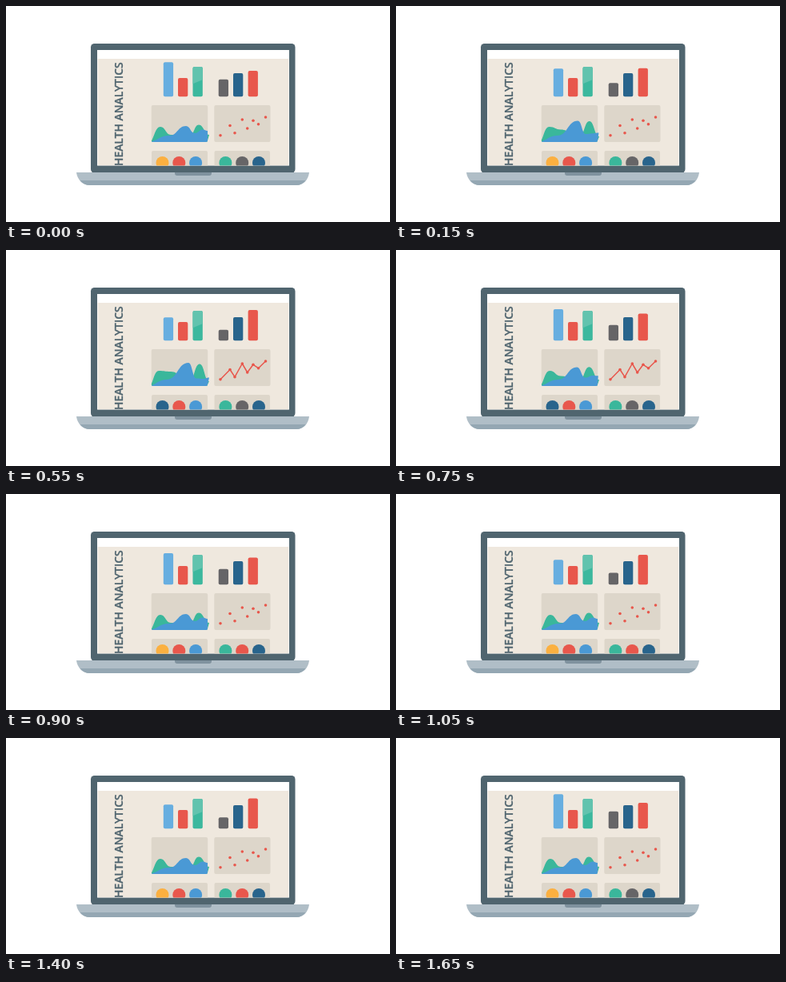
Animation of 480 by 270 pixels, one loop 1700 ms. Source, as an HTML page:

```html
<!DOCTYPE html>
<html lang="en">
<head>
<meta charset="utf-8">
<title>Health analytics</title>
<style>
  html, body { margin: 0; width: 100%; height: 100%; overflow: hidden; background: #fff; }
  svg { display: block; width: 480px; height: 270px; }
  text { font: 600 13.9px "Open Sans", sans-serif; fill: #50656f; stroke: #50656f; stroke-width: .3px; }
</style>
</head>
<body>
<svg viewBox="0 0 480 270">
  <defs>
    <clipPath id="screen"><rect x="114" y="55" width="240" height="144.600"/></clipPath>
    <clipPath id="tealBar"><rect x="233.500" y="76" width="12.300" height="37.300" rx="2"/></clipPath>
    <clipPath id="chart"><rect x="181.700" y="124" width="76" height="46" rx="2"/></clipPath>
  </defs>

  <rect x="106" y="47" width="255.500" height="161.500" rx="4.500" fill="#50656f"/>
  <path d="M88 208H379C378 217 372 224 363 224H105C96 224 89 217 88 208Z" fill="#b0bec7"/>
  <path d="M92.500 218H374.500C371.500 222 367.500 224 363 224H105C99.500 224 95.500 222 92.500 218Z" fill="#94a7b3"/>
  <path d="M211 208H257V209Q257 212 254 212H214Q211 212 211 209Z" fill="#7f929e"/>

  <g clip-path="url(#screen)">
    <rect x="114" y="55" width="240" height="145" fill="#fff"/>
    <rect x="114.700" y="66" width="238.700" height="133.400" fill="#efe8de"/>
    <text transform="translate(146 200) rotate(-90)">HEALTH ANALYTICS</text>
    <g id="bars"></g>
    <g clip-path="url(#tealBar)">
      <rect x="233" y="76" width="14" height="38" fill="#3cb89e"/>
      <path d="M233 76H247V91.500L233 97.500Z" fill="#62c3ae"/>
    </g>
    <g fill="#ddd6ca">
      <rect x="181.700" y="124" width="70.500" height="46" rx="2"/>
      <rect x="260.300" y="124" width="70.200" height="46" rx="2"/>
      <rect x="182" y="181" width="70" height="30" rx="2"/>
      <rect x="260.500" y="181" width="69.500" height="30" rx="2"/>
    </g>
    <g clip-path="url(#chart)">
      <path id="tealArea" fill="#3ab79b"/>
      <path id="blueArea" fill="#4a99d5"/>
    </g>
    <polyline id="trend" fill="none" stroke="#e8574c" stroke-width="1.500" stroke-linejoin="round"/>
    <g id="dots" fill="#e8574c"></g>
    <g id="circles"></g>
  </g>
</svg>

<script>
const LOOP = 1700, STEP = 50, BEAT = 825;
const RED = '#e8574c', NAVY = '#28648c', GRAY = '#666567', YELLOW = '#fbb040',
      TEAL = '#3ab79b', BLUE = '#4a99d5';
const $ = id => document.getElementById(id);
const mix = (a, b, k) => a + (b - a) * k;

function add(parent, tag, attrs) {
  const el = document.createElementNS('http://www.w3.org/2000/svg', tag);
  for (const key in attrs) el.setAttribute(key, attrs[key]);
  return $(parent).appendChild(el);
}

function addBar(x, fill, rest, peak = rest) {
  return { el: add('bars', 'rect', { x, width: 12.3, rx: 2, fill }), rest, peak };
}
const bars = [
  addBar(196.8, '#67aee0', 70.3, 87),
  addBar(215, RED, 90),
  addBar(265.7, GRAY, 91.8, 101.2),
  addBar(284, NAVY, 84),
  addBar(302.6, RED, 81, 74)
];

const points = [[268, 161.7], [280, 149.5], [286, 158.7], [295.3, 142],
                [301.7, 153], [309, 143.3], [315.5, 147.7], [324.5, 139]];
$('trend').setAttribute('points', points.join(' '));
points.forEach(([cx, cy]) => add('dots', 'circle', { cx, cy, r: 1.8 }));

const circles = [YELLOW, RED, BLUE, TEAL, GRAY, NAVY].map((fill, i) => {
  const cx = 195.5 + 20.8 * (i % 3) + 78.9 * Math.floor(i / 3);
  return add('circles', 'circle', { cx, cy: 196, r: 8, fill });
});

// crests and valleys of each wave, at rest and swollen
const teal = {
  low: [[177, 172], [193, 151], [206, 161], [229, 163], [241, 148.5], [254, 161]],
  high: [[177, 172], [191, 151], [206, 152], [229, 164], [242, 142.5], [254, 164]]
};
const blue = {
  low: [[176, 170], [204, 162], [225, 150], [236, 159], [246, 154.5], [252, 156]],
  high: [[176, 170], [201, 162], [228, 141], [238, 160.5], [246, 161], [254, 159.5]]
};

function wave({ low, high }, k) {
  const pts = low.map((p, i) => p.map((v, j) => mix(v, high[i][j], k)));
  const curves = pts.slice(1).map(([x, y], i) => {
    const [x0, y0] = pts[i], mid = (x0 + x) / 2;
    return `C${mid} ${y0} ${mid} ${y} ${x} ${y}`;
  });
  return `M${pts[0]}${curves.join('')}L252 168Q252 170 250 170H176Z`;
}

function draw(t) {
  const pulse = Math.abs(Math.sin(Math.PI * t / BEAT));
  const swing = pulse ** 1.2;
  const swell = t < BEAT ? Math.min(1, 1.35 * pulse) : 0;
  const lined = t >= 450 && t < 900;
  const flagged = t >= 900 && t < 1500;

  for (const { el, rest, peak } of bars) {
    const y = mix(rest, peak, swing);
    el.setAttribute('y', y);
    el.setAttribute('height', 113.3 - y);
  }
  $('tealArea').setAttribute('d', wave(teal, swell));
  $('blueArea').setAttribute('d', wave(blue, swell));
  $('trend').setAttribute('visibility', lined ? 'visible' : 'hidden');
  circles[0].setAttribute('fill', lined ? NAVY : YELLOW);
  circles[4].setAttribute('fill', flagged ? RED : GRAY);
}

const start = performance.now();
function tick() {
  const t = (performance.now() - start) % LOOP;
  draw(Math.floor(t / STEP) * STEP);
  requestAnimationFrame(tick);
}
tick();
</script>
</body>
</html>
```
